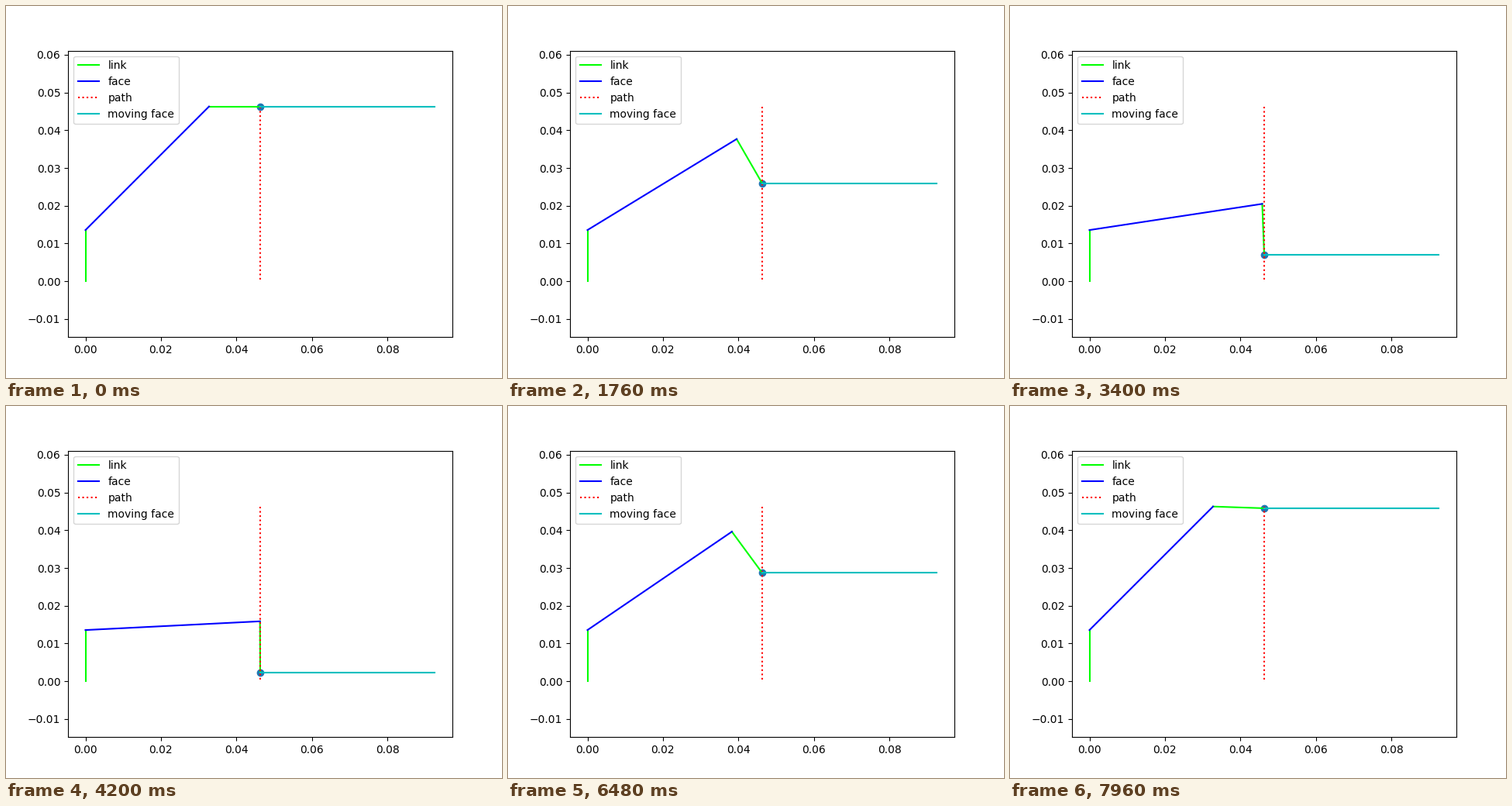
A matplotlib script for the animation above (8000 ms loop, 640x480 px).

```python
import numpy as np
import matplotlib.pyplot as plt
from matplotlib.animation import FuncAnimation

FACE = 0.0463                        # length of the long bar
LINK = FACE * (1 - np.sqrt(0.5))     # length of the short bars
FRAMES = 200
HALF = FRAMES // 2

fig, ax = plt.subplots(figsize=(6.4, 4.8), dpi=100)

# Same scale on both axes, 5% margin in x, centred on the path in y
width = 2.2 * FACE
height = width * 369.6 / 496
ax.set_xlim(-0.1 * FACE, 2.1 * FACE)
ax.set_ylim((FACE - height) / 2, (FACE + height) / 2)

pin = ax.scatter([FACE], [FACE])
ax.plot([0, 0], [0, LINK], color="lime", label="link")
link, = ax.plot([], [], color="lime")
face, = ax.plot([], [], color="b", label="face")
ax.plot([FACE, FACE], [FACE, 0], "r:", label="path")
moving, = ax.plot([], [], color="c", label="moving face")
ax.legend(loc="upper left")


def elbow(y):
    """Joint between the face, hinged at (0, LINK), and the link to (FACE, y)."""
    dx, dy = FACE, y - LINK
    d = np.hypot(dx, dy)
    along = (FACE**2 - LINK**2 + d**2) / (2 * d)
    off = np.sqrt(max(FACE**2 - along**2, 0))
    return (along * dx - off * dy) / d, LINK + (along * dy + off * dx) / d


def update(i):
    y = FACE * abs(HALF - i) / HALF
    ex, ey = elbow(y)
    face.set_data([0, ex], [LINK, ey])
    link.set_data([ex, FACE], [ey, y])
    moving.set_data([FACE, 2 * FACE], [y, y])
    pin.set_offsets([[FACE, y]])
    return face, link, moving, pin


anim = FuncAnimation(fig, update, frames=FRAMES, interval=40, repeat=True)
plt.show()
```
